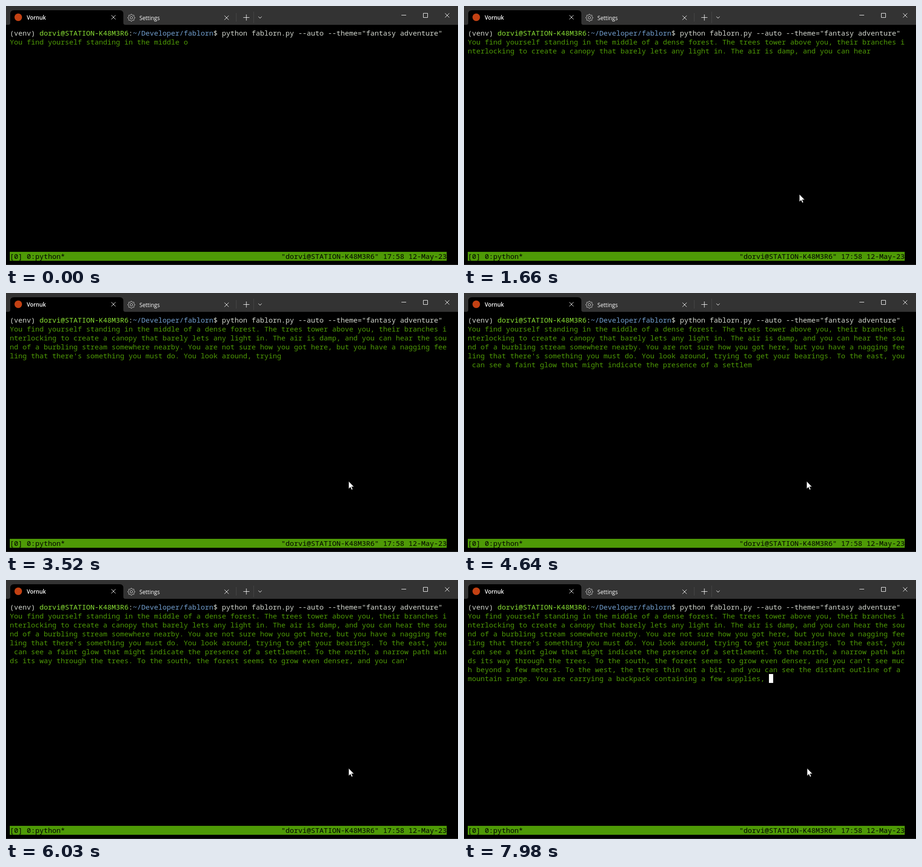
An HTML page for the animation above (8000 ms loop, 959 px wide and 551 px high).

```html
<!DOCTYPE html>
<html lang="en">
<head>
<meta charset="utf-8">
<title>Terminal</title>
<style>
  html, body { margin: 0; height: 100%; overflow: hidden; background: #000; }
  svg { display: block; width: 100vw; height: 100vh; }
  text { white-space: pre; }
  .term { font: 500 15px "Noto Sans Mono", "DejaVu Sans Mono", monospace; font-variant-ligatures: none; fill: #d3d7cf; }
  .story { fill: #4e9a06; }
  .status { fill: #000; }
  .host { fill: #8ae234; }
  .path { fill: #729fcf; }
  .tab { font: 11.7px "Open Sans", "Noto Sans", sans-serif; fill: #fff; }
  .icon { fill: none; stroke: #fff; }
</style>
</head>
<body>
<svg viewBox="0 0 959 551">
  <rect width="959" height="551"/>
  <rect width="959" height="40" fill="#333"/>
  <path d="M5 40Q9 40 9 36V17Q9 9 17 9H241Q249 9 249 17V36Q249 40 253 40Z"/>
  <circle cx="26" cy="24" r="8" fill="#c34113"/>
  <text class="tab" x="44" y="29" font-weight="600" style="font-weight:600">Vornuk</text>
  <text class="tab" x="283" y="30">Settings</text>
  <path class="icon" d="M223.5 19.5l9 9m0-9l-9 9M463.5 20.5l9 9m0-9l-9 9M503.5 24.5h13M510 18v13M535.5 22.5l3.5 3.5 3.5-3.5"/>
  <path class="icon" d="M839 19.5h10M885.5 15.5h9v9h-9zM931.5 15.5l9 9m0-9l-9 9"/>
  <path class="icon" d="M488.5 15v18M525.5 12v24" style="stroke:#484848"/>
  <g class="icon" transform="translate(266 25)" style="stroke:#d0d0d0">
    <circle r="2.7"/>
    <path id="gear" stroke-linejoin="round"/>
  </g>

  <text class="term" x="8" y="63">(venv) <tspan class="host">dorvi@STATION-K48M3R6</tspan>:<tspan class="path">~/Developer/fablorn</tspan>$ python fablorn.py --auto --theme="fantasy adventure"</text>
  <g id="story"></g>
  <rect id="caret" x="647" y="200" width="9" height="19" fill="#fff"/>

  <rect x="8" y="523" width="927" height="19" fill="#4e9a06"/>
  <text class="term status" x="8" y="538">[0] 0:python*</text>
  <text class="term status" x="584" y="538">"dorvi@STATION-K48M3R6" 17:58 12-May-23</text>
  <rect y="550" width="959" height="1" fill="#333"/>
  <path id="mouse" d="M0 0V16.2L3.7 12.7 6.2 18.3 8.7 17.2 6.3 11.7H11.4Z" fill="#fff" stroke="#000" stroke-width=".7"/>
</svg>
<script>
const LOOP = 8000, TICK = 70, COLUMNS = 103, ROWS = 8;
const story = "You find yourself standing in the middle of a dense forest. The trees tower above you, " +
  "their branches interlocking to create a canopy that barely lets any light in. The air is damp, " +
  "and you can hear the sound of a burbling stream somewhere nearby. You are not sure how you got here, " +
  "but you have a nagging feeling that there's something you must do. You look around, trying to get " +
  "your bearings. To the east, you can see a faint glow that might indicate the presence of a settlement. " +
  "To the north, a narrow path winds its way through the trees. To the south, the forest seems to grow " +
  "even denser, and you can't see much beyond a few meters. To the west, the trees thin out a bit, and " +
  "you can see the distant outline of a mountain range. You are carrying a backpack containing a few supplies, ";

// [time, characters typed]; screen refreshes restart at each entry
const typing = [[0, 42], [820, 118], [1660, 198], [2510, 276], [2560, 281], [3320, 354], [3520, 373],
  [4140, 432], [4640, 479], [5820, 590], [7490, 746], [7980, 792], [LOOP, 792]];
// [time, x, y]
const pointer = [[560, 672, 527], [680, 700, 445], [820, 711, 402], [1400, 711, 402], [1600, 711, 400.5],
  [1730, 712, 400.5], [2000, 727, 400.5], [7000, 727, 400.5], [7070, 728, 400.5], [LOOP, 728, 400.5]];

const $ = id => document.getElementById(id);

function sample(keys, time) {
  const next = Math.max(1, keys.findIndex(key => key[0] > time));
  const a = keys[next - 1], b = keys[next];
  const part = (time - a[0]) / (b[0] - a[0]);
  return a.slice(1).map((value, i) => value + (b[i + 1] - value) * part);
}

function refreshTime(time) {
  const start = typing.filter(key => key[0] <= time).pop()[0];
  return start + Math.floor((time - start) / TICK) * TICK;
}

const lines = Array.from({ length: ROWS }, (_, row) => {
  const line = document.createElementNS("http://www.w3.org/2000/svg", "text");
  line.setAttribute("class", "term story");
  line.setAttribute("x", 8);
  line.setAttribute("y", 82 + 19 * row);
  return $("story").appendChild(line);
});

const teeth = Array.from({ length: 32 }, (_, i) => {
  const angle = (i - 0.5) * Math.PI / 16, radius = i % 4 < 2 ? 7.6 : 5.8;
  return `${radius * Math.cos(angle)} ${radius * Math.sin(angle)}`;
});
$("gear").setAttribute("d", `M${teeth.join("L")}Z`);

function draw() {
  const time = refreshTime(performance.now() % LOOP);
  const typed = story.slice(0, Math.floor(sample(typing, time)[0] + 1e-6));
  lines.forEach((line, row) => {
    line.textContent = typed.slice(row * COLUMNS, (row + 1) * COLUMNS);
  });
  $("caret").style.display = time >= 7980 ? "" : "none";

  const visible = time >= pointer[0][0];
  $("mouse").style.display = visible ? "" : "none";
  if (visible) {
    const [x, y] = sample(pointer, time);
    $("mouse").setAttribute("transform", `translate(${x} ${y})`);
  }
  requestAnimationFrame(draw);
}
draw();
</script>
</body>
</html>
```
